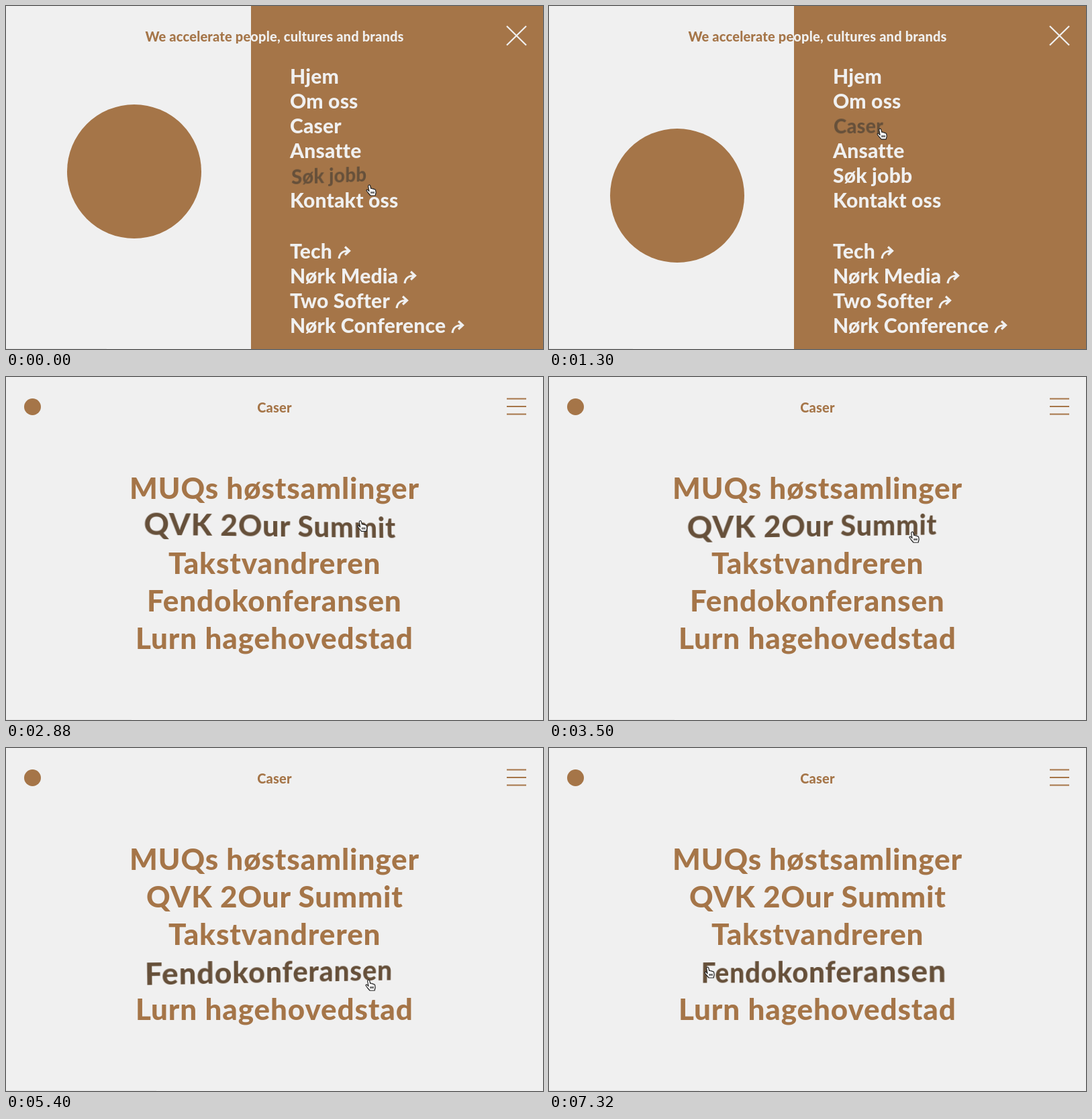
Animation, 800 px wide and 512 px high, one loop 7.34 s. Source, as an HTML page:

```html
<!DOCTYPE html>
<html lang="no">
<head>
<meta charset="utf-8">
<style>
  html, body { margin: 0; width: 100%; height: 100%; overflow: hidden; }
  body { background: #f0f0f0; color: #a57548; font: 800 20px/37px Lato, "Open Sans", sans-serif; letter-spacing: .01em; }
  #stage { position: relative; width: 800px; height: 512px; overflow: hidden; }
  :where(#stage > *, .head, .icon, .layer) { position: absolute; left: 0; top: 0; }
  .layer { width: 800px; height: 512px; display: flex; flex-direction: column; box-sizing: border-box; }
  .head { width: 800px; top: 27px; text-align: center; white-space: nowrap; }
  .icon { fill: none; stroke: currentColor; stroke-width: 2.2; }
  .row { white-space: nowrap; }
  #mark { width: 200px; height: 200px; left: 91px; border-radius: 50%; background: #a57548; }
  #home { width: 25px; height: 25px; left: 27px; top: 32px; border-radius: 50%; background: #a57548; }
  #cases { padding-top: 137px; align-items: center; font-size: 44px; line-height: 56px; letter-spacing: .02em; }
  #panel { width: 800px; height: 512px; background: #a57548; color: #f0f0f0; }
  #menu { padding: 86px 0 0 423px; align-items: flex-start; font-size: 30px; }
  #menu .gap { margin-top: 39px; }
  #menu svg { margin-left: 8px; vertical-align: -1px; fill: none; stroke: currentColor; stroke-width: 3.2; }
  #status { top: 511px; height: 1px; background: #e4e4e4; }
  #cursor { overflow: visible; }
</style>
</head>
<body>
<div id="stage">
  <div id="mark"></div>
  <div id="home"></div>
  <div class="head slogan">We accelerate people, cultures and brands</div>
  <div class="head" id="title">Caser</div>
  <svg class="icon" width="800" height="90"><path/></svg>
  <div id="cases" class="layer"></div>
  <div id="panel">
    <div class="head slogan">We accelerate people, cultures and brands</div>
    <svg class="icon" width="800" height="90"><path/></svg>
    <div id="menu" class="layer"></div>
  </div>
  <div id="status"></div>
  <svg id="cursor" width="18" height="20" stroke-linejoin="round">
    <path id="hand" fill="#fff" stroke="#222" stroke-width="1.2" d="M4.5 1.5c1-.8 2 0 2.2 1l1 4c1-.6 2-.3 2.3.5 1-.5 2-.1 2.3.7 1-.3 2 .2 2.3 1.2l.5 3.6-1 4.5H7L3.5 13 1 9.5c0-1.5 1.4-1.8 2.3-.6L5 10.5 3.6 3c-.1-.7.3-1.2.9-1.5zM8 11v3M10 11v3M12 11v3"/>
    <path id="arrow" fill="#111" stroke="#fff" d="M4 0V14l3.2-3 2.2 5 2.2-1-2.2-4.8H14z"/>
  </svg>
</div>
<script>
const LOOP = 7340, CLICK = 1540;
const $ = id => document.getElementById(id);
const all = q => [...document.querySelectorAll(q)];
const clamp = (v, a = 0, b = 1) => Math.min(b, Math.max(a, v));
const ease = p => p * p * (3 - 2 * p);
const span = (t, from, length) => clamp((t - from) / length);
const mix = (a, b, p) => a + (b - a) * p;
const blend = (a, b, p) => `rgb(${a.map((v, i) => Math.round(mix(v, b[i], p)))})`;

const LIGHT = [240, 240, 240], BROWN = [165, 117, 72], DARK = [102, 80, 58];

// time, x, y of the pointer tip
const path = [
  [0, 540, 267], [350, 540, 267], [1180, 492, 183], [2450, 495, 182],
  [3100, 538, 226], [3500, 540, 231], [3700, 540, 232], [4050, 540, 284],
  [4460, 540, 290], [4620, 540, 321], [5050, 539, 346], [5600, 539, 346],
  [6150, 410, 337], [6850, 250, 328], [LOOP, 235, 327]
];

function pointer(t) {
  const i = Math.max(1, path.findIndex(k => k[0] >= t));
  const [a, b] = [path[i - 1], path[i]];
  const p = ease(span(t, a[0], b[0] - a[0]));
  return [mix(a[1], b[1], p), mix(a[2], b[2], p)];
}

const arrowIcon = '<svg width="20" height="20"><path d="M2 19C3 11 7 7.500 17 7.500M11 1.500l6.500 6-6.500 6"/></svg>';

function addRows(parent, names, base, from, to) {
  return names.map(([name, status, link], i) => {
    const el = document.createElement('div');
    el.className = 'row';
    el.textContent = name;
    if (link) el.insertAdjacentHTML('beforeend', arrowIcon);
    if (name === 'Tech') el.classList.add('gap');
    parent.append(el);
    return { el, i, status, base, from, to };
  });
}

const menu = addRows($('menu'), [
  ['Hjem', 110], ['Om oss', 130], ['Caser', 125], ['Ansatte', 140], ['Søk jobb', 150], ['Kontakt oss', 150],
  ['Tech', 120, 1], ['Nørk Media', 140, 1], ['Two Softer', 140, 1], ['Nørk Conference', 160, 1]
], LIGHT, 0, CLICK + 200);
const cases = addRows($('cases'), [
  ['MUQs høstsamlinger', 235], ['QVK 2Our Summit', 187], ['Takstvandreren', 210],
  ['Fendokonferansen', 224], ['Lurn hagehovedstad', 235]
], BROWN, 1900, LOOP);

for (const r of [...menu, ...cases]) {
  r.w = r.el.offsetWidth / 2;
  r.h = r.el.offsetHeight / 2;
  r.x = r.el.offsetLeft + r.w;
  r.y = r.el.offsetTop + r.h;
}

// Average recent pointer positions so the tilt and colour lag smoothly.
function hover(r, t) {
  const n = 16, out = [0, 0, 0];
  for (let k = 0; k < n; k++) {
    const s = Math.max(0, t - k * 13);
    if (s < r.from || s > r.to) continue;
    const [x, y] = pointer(s), dx = (x - r.x) / r.w, dy = (y - r.y) / r.h;
    if (Math.abs(dy) > 1 || Math.abs(dx) > 1.1) continue;
    out[0] += 1 / n;
    out[1] += clamp(dx, -1, 1) * 19 / n;
    out[2] -= dy * 8 / n;
  }
  return out;
}

function drawRow(r, t, shift) {
  const [h, ry, rx] = hover(r, t);
  r.el.style.color = blend(r.base, DARK, h);
  r.el.style.transform = `translateY(${shift}px) perspective(1000px) rotateX(${rx}deg) rotateY(${ry}deg)`;
  if (h > .5) $('status').style.width = r.status + 'px';
}

function draw(t) {
  const slide = ease(span(t, CLICK, 400)), fade = span(t, 1700, 300);

  $('mark').style.top = 165 - 18 * Math.cos(Math.PI * t / 1300) + 'px';
  $('mark').style.opacity = 1 - span(t, CLICK, 300);
  $('home').style.opacity = $('title').style.opacity = fade;
  all('.slogan').forEach(el => el.style.opacity = 1 - span(t, CLICK, 260));
  $('panel').style.clipPath = `inset(0 0 0 ${mix(365.6, 800, slide)}px)`;
  $('menu').style.transform = `translateX(${434 * slide}px)`;

  const y1 = mix(30, 32.5, slide), y2 = mix(58.5, 55.5, slide);
  const a = mix(y2, y1, slide), b = mix(y1, y2, slide);
  const middle = `M${mix(775, 746, fade)} 44H775`;
  all('.icon path').forEach(el =>
    el.setAttribute('d', `M746 ${y1}L775 ${a}M746 ${y2}L775 ${b}${middle}`));

  menu.forEach(r => drawRow(r, t, 0));
  cases.forEach(r => {
    const p = span(t, 1890 + r.i * 95, 500);
    r.el.style.opacity = p;
    drawRow(r, t, 20 * (1 - p));
  });

  const [x, y] = pointer(t), plain = t > CLICK + 60 && t < 2480;
  $('cursor').style.transform = `translate(${x - 4}px, ${y - 1}px)`;
  $('hand').style.display = plain ? 'none' : '';
  $('arrow').style.display = plain ? '' : 'none';
}

const start = performance.now();
function tick() {
  draw((performance.now() - start) % LOOP);
  requestAnimationFrame(tick);
}
tick();
</script>
</body>
</html>
```
